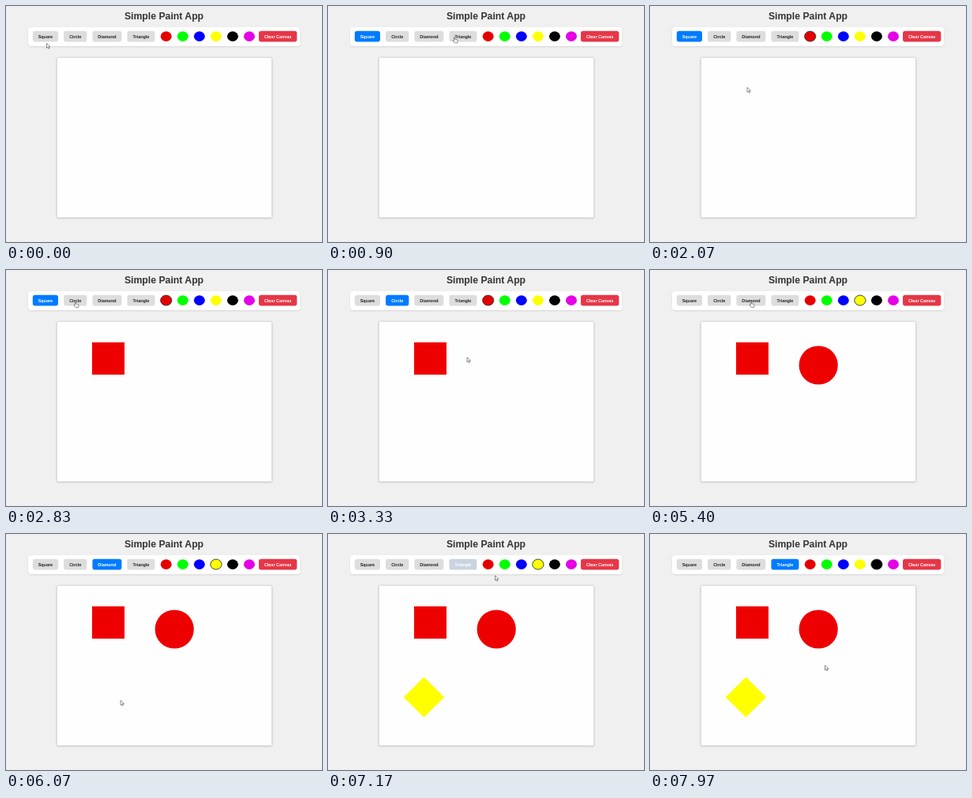
Write an HTML page that moves like this. It is 400 px wide and 300 px high and loops after 8 s.

```html
<!DOCTYPE html>
<html lang="en">
<head>
<meta charset="utf-8">
<title>Simple Paint App</title>
<style>
html, body { margin: 0; width: 100%; height: 100%; overflow: hidden; background: #f0f0f0; }
svg { display: block; width: 100vw; height: 100vh; }
text { font-family: "Liberation Sans", Arial, sans-serif; font-weight: bold; text-anchor: middle; }
</style>
</head>
<body>
<svg viewBox="0 0 400 300">
  <defs>
    <filter id="soft" x="-10%" y="-30%" width="120%" height="160%"><feGaussianBlur stdDeviation="1.2"/></filter>
  </defs>
  <rect width="400" height="300" fill="#f0f0f0"/>
  <text x="200" y="17.2" font-size="12.24" fill="#333">Simple Paint App</text>
  <rect x="28" y="28" width="344" height="24" rx="4" opacity=".1" filter="url(#soft)"/>
  <rect x="28" y="27" width="344" height="24" rx="4" fill="#fff"/>
  <rect x="64" y="66" width="273" height="204" rx="1.5" opacity=".15" filter="url(#soft)"/>
  <rect x="64.3" y="65.3" width="272.4" height="203.8" rx="1.3" fill="#fefefe" stroke="#ccc" stroke-width=".7"/>
  <g id="bar"></g>
  <g id="art"></g>
  <g id="cursor" fill="#fff" stroke="#444" stroke-width=".6" stroke-linejoin="round"></g>
</svg>
<script>
const LOOP = 8000;
const MID = 38.6; // toolbar centre line
const [bar, art, cursor] = ["bar", "art", "cursor"].map(id => document.getElementById(id));

function set(el, attrs) {
  for (const k in attrs) el.setAttribute(k, attrs[k]);
}
function add(parent, tag, attrs, label = "") {
  const el = document.createElementNS("http://www.w3.org/2000/svg", tag);
  set(el, attrs);
  el.textContent = label;
  return parent.appendChild(el);
}
const clamp = v => Math.max(0, Math.min(1, v));
const mix = (a, b, u) => `rgb(${a.map((v, i) => Math.round(v + (b[i] - v) * u))})`;
const show = (el, on) => el.setAttribute("visibility", on ? "visible" : "hidden");

const IDLE = [221, 221, 221], ACTIVE = [0, 123, 255];
const DARK = [34, 34, 34], WHITE = [255, 255, 255];

function button(left, w, label, fill = mix(IDLE, IDLE, 0)) {
  const x = left + w / 2;
  const box = add(bar, "rect", { x: left, y: 31.8, width: w, height: 13.7, rx: 3, fill });
  const text = add(bar, "text", { x, y: 40.5, "font-size": 5.44, fill: "#fff" }, label);
  return { x, y: 40, half: w / 2, box, text };
}

let left = 33.8;
const tools = Object.entries({ Square: 32.2, Circle: 29.3, Diamond: 37, Triangle: 35 }).map(([label, w]) => {
  const b = button(left, w, label);
  left += w + 7.05;
  return b;
});
const [square, circle, diamond, triangle] = tools;
const clear = button(320, 48.3, "Clear Canvas", "#e63748");

const swatches = ["#e60000", "#0f0", "#00f", "#ff0", "#000", "#e600e6"].map((fill, i) => {
  const x = 202.7 + i * 21.06;
  return { x, y: 39.4, half: 7, el: add(bar, "ellipse", { cx: x, cy: MID, fill, stroke: "#333" }) };
});
const [red, , , yellow, black, pink] = swatches;

const shape = (x, y, tag, attrs) => ({ x, y, el: add(art, tag, attrs) });
const redSquare = shape(129, 112, "rect", { x: 109, y: 92, width: 41, height: 41, fill: "#e00" });
const redCircle = shape(213.2, 121, "circle", { cx: 213.2, cy: 121, r: 24.6, fill: "#e00" });
const rhombus = shape(121.4, 207.4, "path", { d: "M121.4 181.7l25.7 25.7-25.7 25.7-25.7-25.7z", fill: "#ff0" });

const arrow = add(cursor, "path", { d: "M0 0V6l1.5-1.3 1 2.2 1-.5-1-2.1h2z" });
const hand = add(cursor, "path", { d: "M-.6 .3q.6-.7 1.2 0v2.4l2.9.7q.7.3.6 1l-.5 2.9h-3.4l-2-2.5q-.2-.9.6-.7l.6.5z" });

// The session: clicks pause on their target, moves only pass through
const click = (at, on) => ({ at, on, x: on.x, y: on.y, before: 100, after: 40 });
const move = (at, x, y) => ({ at, x, y, before: 0, after: 0 });
const script = [
  move(0, 51.5, 47.5), click(300, square), click(1300, red),
  move(2070, 123, 103.5), click(2300, redSquare), click(2950, circle),
  move(3330, 176, 111), click(3650, redCircle),
  move(4450, pink.x, pink.y), click(4730, yellow), click(5400, diamond),
  move(6070, 145, 211.5), click(6250, rhombus), click(7060, triangle),
  move(7170, 211.5, 53), click(7580, black), move(7960, 221.5, 167)
];

function pointer(t) {
  const next = script.findIndex(s => s.at - s.before > t);
  const a = script.at(next < 0 ? -1 : next - 1), b = script.at(next);
  const from = a.at + a.after, to = b.at - b.before;
  const u = next < 0 ? 0 : clamp((t - from) / (to - from));
  const e = u * u * (3 - 2 * u);
  return [a.x + (b.x - a.x) * e, a.y + (b.y - a.y) * e];
}

function lastClick(t, group) {
  return script.findLast(s => s.at <= t && group.includes(s.on));
}

function draw(t) {
  const tool = lastClick(t, tools);
  const since = tool ? t - tool.at : 0;
  for (const b of tools) {
    const on = tool && tool.on === b;
    set(b.box, { fill: mix(IDLE, ACTIVE, on ? clamp(since / 250) ** 3 : 0) });
    set(b.text, { fill: mix(DARK, WHITE, on ? clamp(since / 100) : 0) });
  }

  const color = lastClick(t, swatches);
  for (const s of swatches) {
    const on = color && color.on === s;
    set(s.el, { rx: on ? 7.1 : 7, ry: on ? 6.5 : 6.3, "stroke-width": on ? .9 : 0 });
  }
  for (const s of [redSquare, redCircle, rhombus]) show(s.el, lastClick(t, [s]));

  const [x, y] = pointer(t);
  const over = Math.abs(y - MID) < 6.8
    && [...tools, ...swatches, clear].some(c => Math.abs(x - c.x) < c.half);
  set(cursor, { transform: `translate(${x.toFixed(2)} ${y.toFixed(2)})` });
  show(arrow, !over);
  show(hand, over);
}

const start = performance.now();
function tick() {
  draw((performance.now() - start) % LOOP);
  requestAnimationFrame(tick);
}
tick();
</script>
</body>
</html>
```
